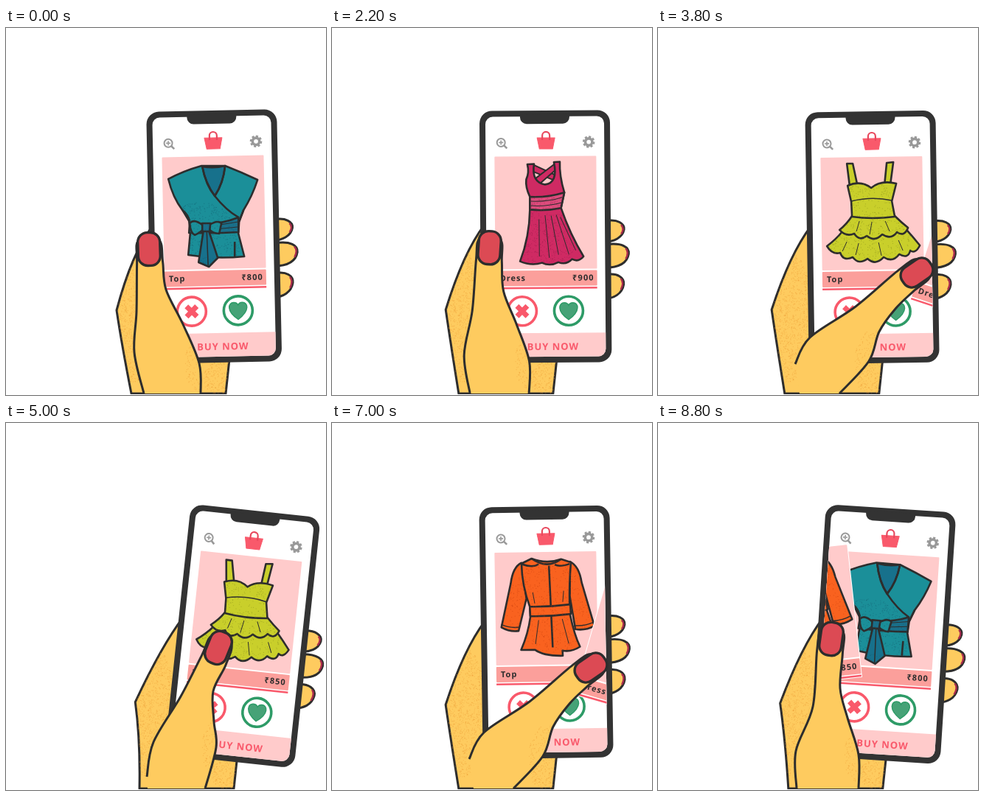
Write an HTML page with a canvas that moves like this. It is 434 px wide and 498 px high and loops after 9000 ms.

```html
<!DOCTYPE html>
<html lang="en">
<head>
<meta charset="utf-8">
<title>Swipe to shop</title>
<style>
html, body { margin: 0; width: 100%; height: 100%; overflow: hidden; background: #fff; }
canvas { display: block; }
</style>
</head>
<body>
<canvas id="stage" width="434" height="498"></canvas>
<script>
const ctx = document.getElementById('stage').getContext('2d');
const LOOP = 9000, STEP = 200;
const INK = '#2d2d2d', SKIN = '#fecb5f', SHADE = '#ec9a34', RED = '#f9596b', PINK = '#ffcbcb', GREEN = '#2e9b67', GREY = '#999';
const FONT = '"Open Sans", "Noto Sans", sans-serif';

// Garments: anchor on the stage (x, y, tilt) and parts as [path, fill, line width]
const garments = [
  { label: 'Top', price: 800, at: [285, 353, -1.2], grain: ['#15586c', 262, 290, 55], parts: [
    ['M265 187L297 187Q320 196 341 206Q334 228 322 247L316 263L315 279L323 310Q285 314 247 308L250 275L248 262L239 247Q226 230 220 205Q240 194 265 187Z', '#1b8f99'],
    ['M266 188Q282 191 297 187Q295 210 283 228Q270 210 266 188Z', '#17718c'],
    ['M266 188Q271 214 283 228Q298 247 315 257M297 187Q294 212 283 228', ''],
    ['M239 247Q246 252 249 262M322 247L316 262M310 290L310 310', ''],
    ['M249 264Q282 270 315 257L315 277Q283 279 248 278Z', '#1a6f8a'],
    ['M284 268L315 263M285 273L314 270', '', 1],
    ['M268 272L261 318L275 324L287 312Q280 290 274 273Z', '#17718c'],
    ['M272 274L274 323', '', 1.5],
    ['M267 268Q255 258 249 265Q250 279 256 281Q264 277 267 273ZM275 268Q286 260 292 265L289 279Q280 279 275 273Z', '#1b8f99'],
    ['M266 265L277 265L276 276L266 276Z', '#1a6f8a']] },
  { label: 'Dress', price: 900, at: [309, 362, 9.3], grain: ['#8f1846', 318, 285, 50], parts: [
    ['M319 194L348 214L344 220L314 201Z', '#cf2a63', 2],
    ['M349 197L352 203L321 222L316 214Z', '#cf2a63', 2],
    ['M311 192L320 193Q312 217 330 223Q348 224 347 195L355 196Q351 215 354 238L346 258Q352 295 365 328Q357 335 349 329Q340 336 330 330Q318 334 308 327Q293 329 279 320Q297 290 304 253L307 236Q303 222 306 212Q312 203 311 192Z', '#cf2a63'],
    ['M307 236Q330 241 354 238L346 258Q325 259 304 253Z', '#dc4c7c'],
    ['M307 242Q330 247 350 244M306 248Q326 253 348 251M314 268L306 318M323 264L319 322M331 266L332 320M338 266L346 322M343 270L356 318', '', 1]] },
  { label: 'Top', price: 850, at: [293, 354, -.9], grain: ['#7f861b', 285, 268, 60], parts: [
    ['M256 184L264 184L270 212L260 216ZM310 183L319 182L315 212L307 213Z', '#c9cf2b'],
    ['M250 276L337 274Q346 284 355 295Q349 307 342 302Q339 314 327 307Q318 319 306 311Q295 323 284 313Q272 322 264 311Q251 317 247 305Q236 308 229 296Q241 287 250 276Z', '#c9cf2b'],
    ['M263 255Q290 259 321 255Q330 264 339 271Q334 284 324 277Q316 288 304 280Q294 291 283 282Q273 290 266 279Q255 284 246 274Q256 266 263 255Z', '#c9cf2b'],
    ['M257 214Q275 206 289 217Q302 206 323 211L317 235L321 256Q290 260 263 256L262 236Z', '#c9cf2b'],
    ['M262 235Q290 228 317 234', '', 1.5],
    ['M273 262L269 276M290 263L287 280M308 262L314 276M256 290L250 303M272 292L268 308M299 291L303 309M326 288L332 302', '', 1]] },
  { label: 'Dress', price: 900, at: [309, 362, 9.3], grain: ['#641a70', 318, 285, 55], parts: [
    ['M312 194Q330 187 353 198Q368 204 371 234Q362 238 354 235L353 222L346 249Q354 290 345 335Q318 337 296 331Q289 300 313 250L312 221L308 228L293 220Q299 198 312 194Z', '#98309c'],
    ['M326 191Q341 191 353 199L329 245Q326 220 326 191Z', '#b655bd'],
    ['M312 206L312 224M356 208L353 224', ''],
    ['M319 290L311 328M326 285L326 331M334 290L338 332', '', 1]] },
  { label: 'Top', price: 850, at: [304, 355, 2.3], grain: ['#c23a0c', 314, 250, 62], parts: [
    ['M277 189Q265 194 261 216L245 275Q256 282 268 281L281 238ZM343 191Q355 198 357 220L371 280Q358 286 345 283L340 238Z', '#f9621f'],
    ['M291 184Q311 193 331 187L344 192Q340 220 339 250L339 263Q343 290 350 307Q338 314 326 311L326 318Q300 317 289 308L270 307Q281 285 285 263L285 249Q276 220 277 190Z', '#f9621f'],
    ['M291 184Q311 200 331 187M278 191Q292 197 300 192M342 194Q328 198 322 194M314 195L313 306', ''],
    ['M245 271Q256 277 270 276M370 275Q357 280 344 278', '', 1.5],
    ['M285 249Q312 251 340 249L340 262Q312 264 285 262Z', '#f9621f'],
    ['M296 268L290 300M328 268L335 302M290 230L292 245M332 230L330 245', '', 1]] }
];

// Top card swipes, one per garment: [time, dx, dy, tilt]; the card is gone at the last time
const left = (t, x, y, a) => [[t, 0, 0, 0], [t + 200, x, y, a], [t + 400, 2 * x, 0, 2 * a]];
const right = t => [[t, 0, 0, 0], [t + 200, -6, 3, 3.2], [t + 400, 4, 5, 5], [t + 1000, 102, 34, 17], [t + 1200, 116, 37, 19], [t + 1400, 200, 45, 28]];
const swipes = [left(1200, -80, 9, -8), right(2600), left(5200, -94, 0, -10), right(6000), left(8600, -94, 0, -10)];

// Poses: phone x, y, tilt; nail x, y, tilt; left edge of thumb upwards; right edge downwards
const farLeft = [281, 153, -1.2, 194, 300, -2, 187, 496, 174, 440, 177, 385, 217, 355, 240, 402, 262, 455, 264, 496];
const nearLeft = [292, 152, -.7, 212, 297, 5, 187, 496, 180, 450, 190, 385, 234, 360, 252, 402, 269, 450, 268, 496];
const ready = [336, 160, 6.1, 288, 305, 22, 191, 480, 200, 433, 237, 371, 281, 364, 282, 405, 285, 440, 270, 496];
const farRight = [290, 154, -.9, 351, 332, 55, 186, 456, 206, 420, 268, 378, 322, 381, 300, 412, 286, 452, 246, 496];
const relaxed = [312, 155, 2.3, 272, 296, 18, 188, 496, 192, 440, 228, 375, 274, 360, 276, 405, 280, 450, 274, 496];
const pulling = [315, 157, 3.7, 235, 293, 8, 188, 496, 187, 445, 210, 385, 247, 360, 257, 400, 272, 450, 272, 496];
const mix = (a, b, k) => a.map((v, i) => v + (b[i] - v) * k);
const middle = mix(nearLeft, relaxed, .25), overLeft = mix(nearLeft, farLeft, 1.4);
const moves = [[0, farLeft], [800, middle], [1200, middle], [1400, nearLeft], [1600, overLeft], [1800, overLeft],
  [2400, middle], [2800, ready], [3000, ready], [3500, farRight], [3800, farRight], [4400, relaxed], [5000, ready],
  [5200, ready], [5400, pulling], [6000, ready], [6400, ready], [6900, farRight], [7200, farRight], [7800, relaxed],
  [8400, ready], [8600, ready], [8800, pulling], [9000, farLeft]].map(([t, p]) => [t, ...p]);

function sample(keys, t) {
  const i = keys.findIndex(k => k[0] > t);
  if (i < 0) return keys.at(-1).slice(1);
  if (i === 0) return keys[0].slice(1);
  const a = keys[i - 1], b = keys[i];
  return mix(a, b, (t - a[0]) / (b[0] - a[0])).slice(1);
}

const rad = deg => deg * Math.PI / 180;
function turn(x, y, deg, px, py) {
  const c = Math.cos(rad(deg)), s = Math.sin(rad(deg));
  return [x + px * c - py * s, y + px * s + py * c];
}
function paint(path, fill, width = 2.6, color = INK) {
  if (typeof path === 'string') path = new Path2D(path);
  if (fill) { ctx.fillStyle = fill; ctx.fill(path); }
  if (width) { ctx.lineWidth = width; ctx.strokeStyle = color; ctx.stroke(path); }
}
function box(x, y, w, h, r, fill, width = 0, color) {
  const path = new Path2D();
  path.roundRect(x, y, w, h, r);
  paint(path, fill, width, color);
  return path;
}
function ring(x, y, r, width, color, fill) {
  const path = new Path2D();
  path.arc(x, y, r, 0, 7);
  paint(path, fill, width, color);
}
function text(str, x, y, size, color, align, spacing) {
  ctx.font = `bold ${size}px ${FONT}`;
  ctx.letterSpacing = spacing + 'px';
  ctx.textAlign = align;
  ctx.fillStyle = color;
  ctx.fillText(str, x, y);
}
// Seeded stipple shading inside a path
function grain(path, color, x, y, r, count, stretch = 1) {
  let seed = 7;
  const rnd = () => (seed = seed * 16807 % 2147483647) / 2147483647;
  ctx.save();
  ctx.clip(path);
  ctx.globalAlpha = .45;
  ctx.fillStyle = color;
  for (let i = 0; i < count; i++) {
    const d = r * Math.sqrt(rnd()), a = rnd() * 2 * Math.PI;
    ctx.fillRect(x + d * Math.cos(a), y + d * Math.sin(a) * stretch, 1, 1);
  }
  ctx.restore();
}
// Smooth curve through points
function spline(pts) {
  const path = new Path2D();
  path.moveTo(...pts[0]);
  for (let i = 0; i < pts.length - 1; i++) {
    const p = pts[i - 1] || pts[i], a = pts[i], b = pts[i + 1], n = pts[i + 2] || b;
    path.bezierCurveTo(a[0] + (b[0] - p[0]) / 6, a[1] + (b[1] - p[1]) / 6,
      b[0] - (n[0] - a[0]) / 6, b[1] - (n[1] - a[1]) / 6, ...b);
  }
  return path;
}

function drawCard({ label, price, at, grain: [shade, gx, gy, gr], parts }, [dx, dy, tilt]) {
  ctx.save();
  ctx.translate(dx, 200 + dy);
  ctx.rotate(rad(tilt));
  box(-71, -180, 140, 182, 1, '#fff');
  box(-70, -179, 138, 153, 1, PINK);
  box(-70, -24, 138, 21, 1, '#fb9f9b');
  box(-70, -1.5, 138, 2.5, 0, RED);
  text(label, -64, -10, 11, INK, 'left', 1);
  text('₹' + price, 64, -10, 11, INK, 'right', 1.1);
  ctx.rotate(rad(-at[2]));
  ctx.translate(-at[0], -at[1]);
  const all = new Path2D();
  parts.forEach(([d, fill, width]) => {
    paint(d, fill, width);
    if (fill) all.addPath(new Path2D(d));
  });
  grain(all, shade, gx, gy, gr, 700);
  ctx.restore();
}

function drawIcons() {
  ring(-61, 2, 5.5, 2, GREY);
  paint('M-64 2L-58 2M-61 -1L-61 5', '', 1.6, GREY);
  paint('M-57 6L-53 10', '', 2.6, GREY);
  ring(58, 2, 4.7, 3.6, GREY);
  ctx.setLineDash([3, 2.3]);
  ring(58, 2, 6.8, 3, GREY);
  ctx.setLineDash([]);
  paint('M-12 -4L12 -4L9 11L-9 11Z', RED, 1, RED);
  paint('M-5 -1L-5 -7A5 5 0 0 1 5 -7L5 -1', '', 2.2, '#e8485d');
  ring(-34, 231, 19.5, 3.6, RED, '#fff');
  paint('M-41 224L-27 238M-27 224L-41 238', '', 7, RED);
  ring(29, 231, 19.5, 3.6, GREEN, '#fff');
  paint('M29 243C12 231 16 220 23 220Q28 220 29 224Q30 220 35 220C42 220 46 231 29 243Z', '#46a277', 1.5, GREEN);
}

function drawFingers(drop) {
  [[106, 105, 28], [138, 111, 31], [179, 104, 32]].forEach(([y, tip, h]) => {
    const top = y + drop;
    paint(`M78 ${top}C${tip - 8} ${top - 4} ${tip + 1} ${top + 4} ${tip} ${top + h * .4}C${tip - 2} ${top + h * .8} ${tip - 14} ${top + h} 78 ${top + h}Z`, SKIN, 3);
    paint(`M${tip - 4} ${top + 5}Q${tip + 1} ${top + 10} ${tip - 4} ${top + h * .62}`, '', 2.4, '#a82b4c');
  });
}

function drawPhone(t, x, y, tilt) {
  ctx.save();
  ctx.translate(x, y);
  ctx.rotate(rad(tilt));
  drawFingers(3 + (x - 281) * .1);
  box(-90, -41, 177, 342, 17, '#333');
  const screen = box(-82, -33, 161, 326, 10, '#fff');
  ctx.save();
  ctx.clip(screen);
  drawIcons();
  box(-84, 261, 166, 34, 0, PINK);
  text('BUY NOW', 7.5, 284, 13, RED, 'center', 1);
  const top = swipes.findIndex(keys => t < keys.at(-1)[0]);
  drawCard(garments[(top + 1) % garments.length], [0, 0, 0]);
  drawCard(garments[top], sample(swipes[top], t));
  ctx.restore();
  box(-35, -36, 67, 13, [0, 0, 9, 9], '#333');
  ctx.restore();
}

function drawPalm(x, y, tilt) {
  const shift = x - 281, wrist = 170 + .2 * shift, elbow = [150 + .46 * shift, 383 - .08 * shift];
  const [ax, ay] = turn(x, y, tilt, -84, 113);
  const palm = new Path2D(`M${ax} ${ay}Q${ax - 29} ${ay + 38} ${elbow}Q${elbow[0] + 7} 430 ${wrist} 496L${wrist + 128} 496L${wrist + 134} 440Z`);
  paint(palm, SKIN, 3);
  grain(palm, SHADE, elbow[0] + 18, 390, 38, 1500, 2.4);
  grain(palm, SHADE, wrist + 122, 475, 25, 300);
}

function drawThumb(pose) {
  const [nx, ny, tilt] = pose.slice(3, 6), pts = [];
  for (let i = 6; i < pose.length; i += 2) pts.push([pose[i], pose[i + 1]]);
  const tip = [[-17, 18], [-14, -12], [14, -12], [18, 18]].map(p => turn(nx, ny, tilt, ...p));
  const edge = spline([...pts.slice(0, 3), ...tip, ...pts.slice(3)]);
  const body = new Path2D(edge);
  body.lineTo(192, 496);
  body.closePath();
  paint(body, SKIN, 0);
  grain(body, SHADE, pts[5][0] + 4, pts[5][1], 24, 250, 1.8);
  paint(edge, '', 3);
  ctx.save();
  ctx.translate(nx, ny);
  ctx.rotate(rad(tilt));
  box(-15, -22.5, 30, 45, 13, '#dc4a54', 3.4, INK);
  ctx.restore();
}

function draw(t) {
  const pose = sample(moves, t), phone = pose.slice(0, 3);
  ctx.clearRect(0, 0, 434, 498);
  ctx.save();
  ctx.beginPath();
  ctx.rect(0, 0, 434, 497);
  ctx.clip();
  drawPalm(...phone);
  drawPhone(t, ...phone);
  drawThumb(pose);
  ctx.restore();
}

ctx.lineJoin = 'round';
let shown = -1;
function tick() {
  const t = Math.floor(performance.now() % LOOP / STEP) * STEP;
  if (t !== shown) draw(shown = t);
  requestAnimationFrame(tick);
}
tick();
</script>
</body>
</html>
```
